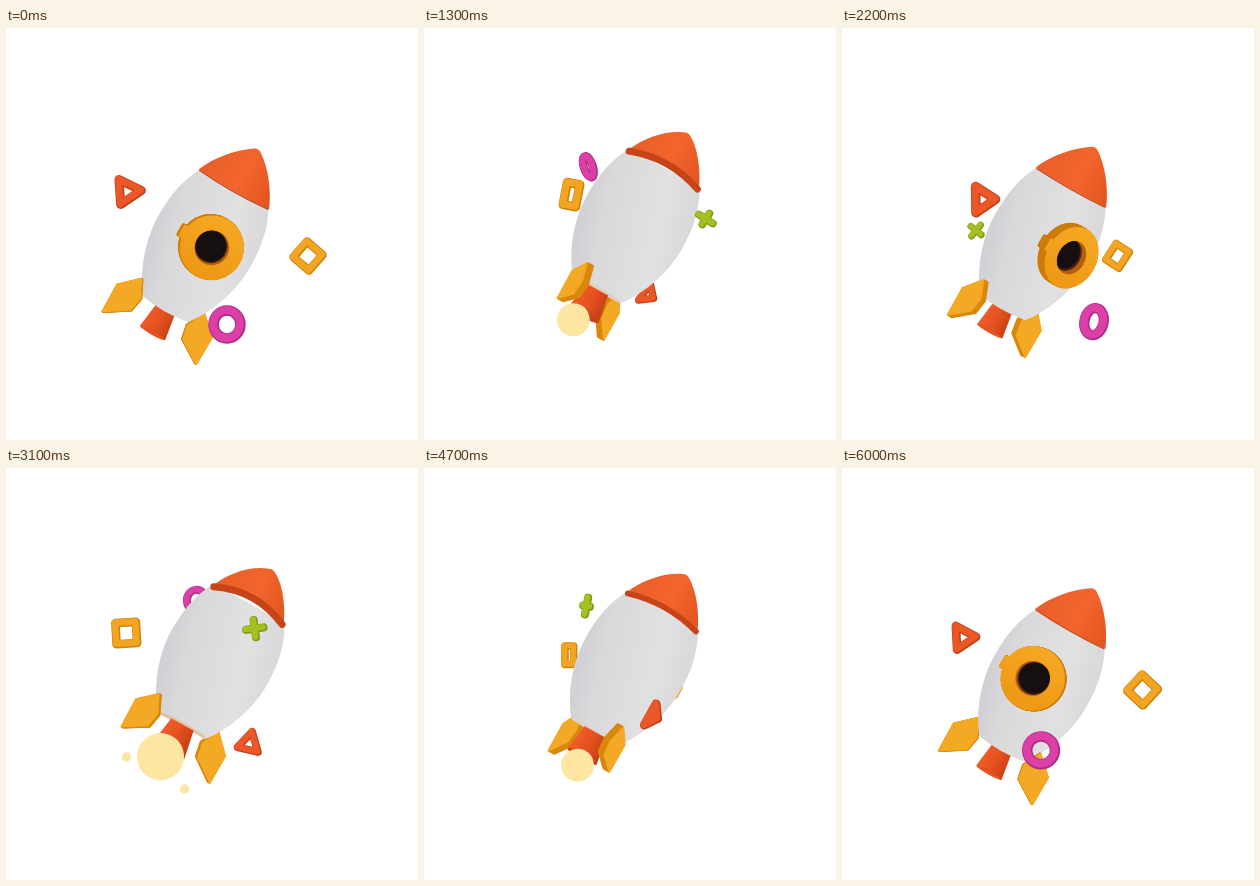
Recreate the animation shown at these times as an HTML page with a canvas. Size 412 by 412 pixels, loop 6.1 s.

```html
<!DOCTYPE html>
<html lang="en">
<head>
<meta charset="utf-8">
<title>Rocket</title>
<style>
html, body { margin: 0; width: 100%; height: 100%; overflow: hidden; background: #fff; }
canvas { display: block; width: 412px; height: 412px; }
</style>
</head>
<body>
<canvas id="stage" width="412" height="412"></canvas>
<script>
const ctx = document.getElementById('stage').getContext('2d');
const STEPS = 61, STEP_MS = 100, TURNS = 3, TAU = Math.PI * 2;
const rad = deg => deg * Math.PI / 180;
const clamp = v => Math.max(0, Math.min(1, v));

// x, y and tilt are waves: [middle, cosine part, sine part].
// near: orbit angle closest to the viewer; face: offset of the flat side.
const charms = [
  { outline: ringPath, tube: 10.5, dark: '#ae2b80', light: '#dc40a8', near: 0, face: .28,
    x: [209, 12, 56], y: [215.5, 81, 22], tilt: [0, 0, 24] },
  { outline: crossPath, tube: 8.2, dark: '#7c9812', light: '#a3c122', near: 2.8, face: -.2,
    x: [207, -33, -78], y: [195.5, 40, -42], tilt: [72, 0, -66] },
  { outline: trianglePath, tube: 9.6, dark: '#c0421a', light: '#ec5727', near: 1, face: 0,
    x: [183, -62, 12], y: [219.5, -56, -5], tilt: [20, -24, 0] },
  { outline: squarePath, tube: 9.6, dark: '#cd8408', light: '#f2a422', near: -1.6, face: .1,
    x: [210, 92, -14], y: [197, 31, 10], tilt: [18, 23, -10] }
];

const wave = ([middle, c, s], angle) => middle + c * Math.cos(angle) + s * Math.sin(angle);

function polygon(points) {
  ctx.beginPath();
  points.forEach(([x, y]) => ctx.lineTo(x, y));
  ctx.closePath();
}

function ringPath(s, k) {
  ctx.beginPath();
  ctx.ellipse(0, 0, 14 * s * k, 14 * s, 0, 0, TAU);
}
function trianglePath(s, k) {
  const r = 15.2 * s;
  polygon([0, 120, 240].map(a => [r * k * Math.cos(rad(a)), r * Math.sin(rad(a))]));
}
function squarePath(s, k) {
  const h = 11.8 * s, w = h * k;
  polygon([[-w, -h], [w, -h], [w, h], [-w, h]]);
}
function crossPath(s, k) {
  const r = 8.8 * s;
  ctx.beginPath();
  ctx.moveTo(-r * k, 0); ctx.lineTo(r * k, 0);
  ctx.moveTo(0, -r); ctx.lineTo(0, r);
}

// Perspective makes the orbits seem to hurry past their start
const orbitAngle = theta => theta + .25 * Math.sin(theta);
const depth = (charm, theta) => Math.cos(orbitAngle(theta) - charm.near);

function drawCharm(charm, theta) {
  const angle = orbitAngle(theta);
  const size = .88 + .12 * depth(charm, theta);
  const squash = Math.max(.4, Math.abs(Math.cos(theta + charm.face)));
  const pass = (color, width, shift) => {
    ctx.save();
    ctx.translate(wave(charm.x, angle) + shift, wave(charm.y, angle) + shift);
    ctx.rotate(rad(wave(charm.tilt, theta)));
    charm.outline(size, squash);
    ctx.strokeStyle = color;
    ctx.lineWidth = width * size;
    ctx.stroke();
    ctx.restore();
  };
  pass(charm.dark, charm.tube, 0);
  pass(charm.light, charm.tube * .75, -.5);
}

function gradient(x0, y0, x1, y1, ...colors) {
  const g = ctx.createLinearGradient(x0, y0, x1, y1);
  colors.forEach((c, i) => g.addColorStop(i / (colors.length - 1), c));
  return g;
}

function disc(x, y, rx, ry, fill) {
  ctx.beginPath();
  ctx.ellipse(x, y, rx, ry, 0, 0, TAU);
  ctx.fillStyle = fill;
  ctx.fill();
}

// Rocket parts use a frame whose y axis runs from nose to tail.
function drawFin(angle, lean) {
  const side = Math.sin(angle), near = Math.cos(angle);
  const profile = [[36, 150], [27, 168], [30, 183], [54, 198], [54.5, 167]];
  const layer = (offset, color) => {
    polygon(profile.map(([r, y]) => [r * side + offset * near, y - 1.3 * lean * r * near]));
    ctx.fillStyle = ctx.strokeStyle = color;
    ctx.lineWidth = 1.6;
    ctx.fill();
    ctx.stroke();
  };
  const facing = side * near > 0 ? -1 : 1;
  for (let i = -4; i < 4; i++) layer(-facing * i, '#d8880c');
  layer(-facing * 4, '#f3a924');
}

function drawPort(angle, lean) {
  const side = Math.sin(angle), near = Math.cos(angle), reach = 48 + 10 * near;
  const squash = Math.max(.04, Math.abs(near));
  const at = r => [r * side, 87 - lean * r * near];
  const plate = (r, color) => {
    const [x, y] = at(r);
    disc(x, y, 32.5 * squash, 32.5, color);
    ctx.beginPath();
    ctx.roundRect(x - 36 * near, y - 7, 8 * near, 14, 2);
    ctx.fill();
  };
  for (let r = reach - 13; r < reach; r++) plate(r, '#cc7c0a');
  plate(reach, gradient(0, 54, 0, 118, '#f6a924', '#ee9814'));
  if (near <= 0) return;
  const [x, y] = at(reach);
  disc(x, y, 17.5 * squash, 17.5, '#b26008');
  ctx.save();
  ctx.clip();
  disc(x - 7 * side, y - .5, 16.5 * squash, 16.5, '#4b2117');
  disc(x - 9 * side, y - 1, 15.5 * squash, 15.5, '#15100f');
  ctx.restore();
}

function drawNozzle(lean) {
  const flare = 1 + 1.5 * Math.max(0, lean);
  polygon([[-10, 160], [10, 160], [15, 192], [-14, 192]].map(([x, y]) => [x * flare, y]));
  ctx.fillStyle = gradient(-14, 0, 15, 0, '#ee5d2a', '#e5511f', '#c94015');
  ctx.fill();
  disc(.5, 192, 14.5 * flare, Math.abs(lean) * 18 + 1.5, lean > 0 ? '#c94015' : '#e5511f');
}

function drawBody(lean) {
  ctx.save();
  ctx.scale(1 + .25 * lean, 1);
  ctx.beginPath();
  ctx.moveTo(-39, 25);
  ctx.bezierCurveTo(-50, 45, -53, 65, -53, 87);
  ctx.bezierCurveTo(-53, 117, -40, 148, -26, 165);
  ctx.quadraticCurveTo(0, 169 - lean * 20, 26, 165);
  ctx.bezierCurveTo(40, 148, 53, 117, 53, 87);
  ctx.bezierCurveTo(53, 65, 50, 45, 39, 25);
  ctx.closePath();
  ctx.fillStyle = gradient(-53, 110, 53, 80, '#cfcfd4', '#d9d8da', '#dddcde', '#e2e1e2', '#d9d8da');
  ctx.fill();
  ctx.globalAlpha = .7 * clamp((lean - .08) / .06);
  ctx.beginPath();
  ctx.moveTo(-22, 164);
  ctx.quadraticCurveTo(0, 164 - lean * 20, 24, 164);
  ctx.strokeStyle = '#e9b98c';
  ctx.lineWidth = 3;
  ctx.stroke();
  ctx.restore();
}

function drawCone(lean) {
  const bend = 27 - lean * 120;
  const tipX = 2 + 15 * lean, tipY = -19.5 + 25 * Math.max(0, lean);
  ctx.beginPath();
  ctx.moveTo(-40.5, 27);
  ctx.bezierCurveTo(-33, 9, -17, -9, tipX - 4, tipY + 1);
  ctx.quadraticCurveTo(tipX, tipY - 1, tipX + 3, tipY + 1);
  ctx.bezierCurveTo(19, -9, 33, 9, 40.5, 27);
  ctx.quadraticCurveTo(0, bend, -40.5, 27);
  ctx.fillStyle = gradient(-36, 0, 38, 0, '#ea5e29', '#f2652d', '#e2551f');
  ctx.fill();
  ctx.beginPath();
  ctx.moveTo(-39, 27.5);
  ctx.quadraticCurveTo(0, bend + .5, 39, 27.5);
  ctx.strokeStyle = '#c64418';
  ctx.lineWidth = 1.2 + 5.8 * clamp(lean / .12);
  ctx.stroke();
}

function drawFlame(turn, theta) {
  const color = '#fce6a2';
  const burn = (turn - .164) / .623, puff = (turn - .41) / .213;
  if (burn > 0 && burn < 1) {
    const r = 24.3 * Math.sin(Math.PI * burn);
    disc(4 * Math.sin(theta) - 3, 202, r, r, color);
  }
  if (puff > 0 && puff < 1) {
    const r = 4.7 * Math.sin(Math.PI * puff);
    for (const side of [-1, 1]) disc(side * (16 + 32 * puff), 208 + 20 * puff, r, r, color);
  }
}

function drawRocket(turn, theta) {
  const lift = 1 - Math.cos(theta);
  const rise = 14.2 * lift + .6 * Math.sin(theta);
  const lean = .06 - .09 * Math.cos(theta);
  const spin = theta + .17;
  const fins = [spin - Math.PI / 2, spin + Math.PI / 2];
  const portNear = Math.cos(spin) > 0;
  ctx.save();
  ctx.translate(241.3 + .496 * rise, 137.9 - .868 * rise);
  ctx.rotate(rad(29.7 - .4 * lift));
  fins.filter(a => Math.cos(a) < 0).forEach(a => drawFin(a, lean));
  if (!portNear) drawPort(spin, lean);
  if (lean <= 0) drawNozzle(lean);
  drawBody(lean);
  if (lean > 0) drawNozzleBelow(lean);
  drawCone(lean);
  if (portNear) drawPort(spin, lean);
  fins.filter(a => Math.cos(a) >= 0).forEach(a => drawFin(a, lean));
  drawFlame(turn, theta);
  ctx.restore();
}

// Seen from below, the nozzle overlaps the end of the body
function drawNozzleBelow(lean) {
  ctx.save();
  ctx.beginPath();
  ctx.rect(-40, 166 - lean * 18, 80, 60);
  ctx.clip();
  drawNozzle(lean);
  ctx.restore();
}

function draw(now) {
  const step = Math.floor(now / STEP_MS) % STEPS;
  const turn = step * TURNS / STEPS % 1, theta = turn * TAU;
  ctx.fillStyle = '#fff';
  ctx.fillRect(0, 0, 412, 412);
  ctx.lineJoin = ctx.lineCap = 'round';
  const isFront = charm => depth(charm, theta) > 0;
  charms.filter(c => !isFront(c)).forEach(c => drawCharm(c, theta));
  drawRocket(turn, theta);
  charms.filter(isFront).forEach(c => drawCharm(c, theta));
}

let start;
function tick(now) {
  start ??= now;
  draw(now - start);
  requestAnimationFrame(tick);
}
draw(0);
requestAnimationFrame(tick);
</script>
</body>
</html>
```
